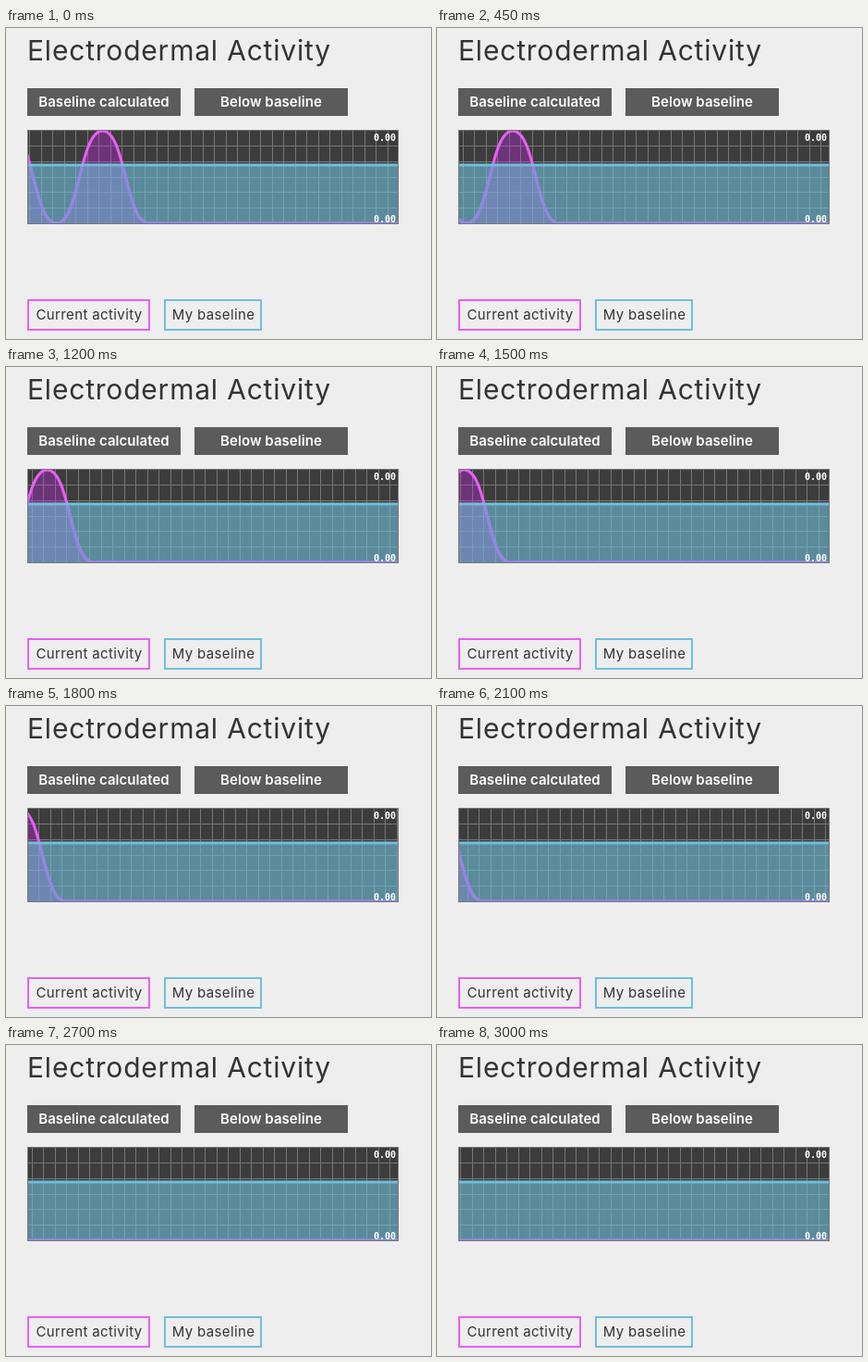
Write an HTML page that moves like this. It is 460 by 336 pixels and loops after 3.1 s.

```html
<!DOCTYPE html>
<html lang="en">
<head>
<meta charset="utf-8">
<title>Electrodermal Activity</title>
<style>
  html, body { margin: 0; width: 100%; height: 100%; overflow: hidden; background: #eee; }
  svg { display: block; }
  text { font: 400 15px Inter, sans-serif; letter-spacing: .38px; fill: #333; }
  .title { font-size: 30px; letter-spacing: .8px; }
  .mid { text-anchor: middle; }
  .status { font-weight: 600; letter-spacing: .05px; fill: #fff; }
  .scale { font: 700 10px "DejaVu Sans Mono", monospace; letter-spacing: 0; fill: #fff; text-anchor: end; }
  .button { fill: #5b5b5b; }
  .legend { fill: none; stroke-width: 2; }
  .activity { stroke: #e85ff5; }
  .baseline { stroke: #70bedb; }
  .line { fill: none; stroke-width: 3; }
  .grid { fill: none; stroke: #777; }
</style>
</head>
<body>
<svg width="460" height="336" viewBox="0 0 460 336">
  <text class="title" x="23" y="35">Electrodermal Activity</text>

  <rect class="button" x="23" y="65" width="166" height="30"/>
  <text class="status mid" x="106" y="85">Baseline calculated</text>
  <rect class="button" x="204" y="65" width="166" height="30"/>
  <text class="status mid" x="287" y="85">Below baseline</text>

  <svg x="24" y="111" width="400" height="100">
    <rect width="400" height="100" fill="#3c3c3c"/>
    <path id="rows" class="grid"/>
    <path id="columns" class="grid"/>
    <path id="area" class="moving" fill="#d723ff" fill-opacity=".3"/>
    <path class="line activity wave moving"/>
    <rect y="37" width="400" height="63" fill="#70bedb" fill-opacity=".6"/>
    <svg y="37" width="400" height="63" viewBox="0 37 400 63">
      <path class="line wave moving" stroke="#9485e2"/>
    </svg>
    <path class="line baseline" d="M0 37H400"/>
    <text class="scale" x="398" y="11">0.00</text>
    <text class="scale" x="398" y="98.5">0.00</text>
  </svg>
  <rect x="23.5" y="110.5" width="401" height="101" fill="none" stroke="#777"/>

  <rect class="legend activity" x="24" y="294" width="131" height="32"/>
  <text class="mid" x="90" y="315">Current activity</text>
  <rect class="legend baseline" x="172" y="294" width="104" height="32"/>
  <text class="mid" x="224.5" y="315">My baseline</text>
</svg>
<script>
  const LOOP = 3100, STEP = 150, SPEED = 0.05;
  const WIDTH = 400, HEIGHT = 100, CELL = 12.5, GRID_START = 1;
  const byId = id => document.getElementById(id);
  const each = (selector, fn) => document.querySelectorAll(selector).forEach(fn);
  const sharp = v => Math.round(v) + 0.5;

  // Samples one second apart, joined by horizontal-tangent curves.
  const samples = [[-19.5, 0], [30.5, HEIGHT], [80.5, 0], [130.5, HEIGHT]];
  const wave = samples.map(([x, y], i) => {
    if (!i) return `M${x} ${y}`;
    const [px, py] = samples[i - 1], mid = (px + x) / 2;
    return `C${mid} ${py} ${mid} ${y} ${x} ${y}`;
  }).join('') + 'H600';

  each('.wave', path => path.setAttribute('d', wave));
  byId('area').setAttribute('d', `${wave}H${samples[0][0]}Z`);

  let rows = '';
  for (let i = 1; i < 6; i++) rows += `M0 ${Math.floor(i * HEIGHT / 6) + 0.5}H${WIDTH}`;
  byId('rows').setAttribute('d', rows);

  function draw(time) {
    const shift = Math.floor(time % LOOP / STEP) * STEP * SPEED;
    each('.moving', path => path.setAttribute('transform', `translate(${-shift})`));

    let columns = '';
    for (let x = GRID_START - shift % CELL; x < WIDTH; x += CELL) {
      columns += `M${sharp(x)} 0V${HEIGHT}`;
    }
    byId('columns').setAttribute('d', columns);
  }

  const start = performance.now();
  function tick() {
    draw(performance.now() - start);
    requestAnimationFrame(tick);
  }
  tick();
</script>
</body>
</html>
```
